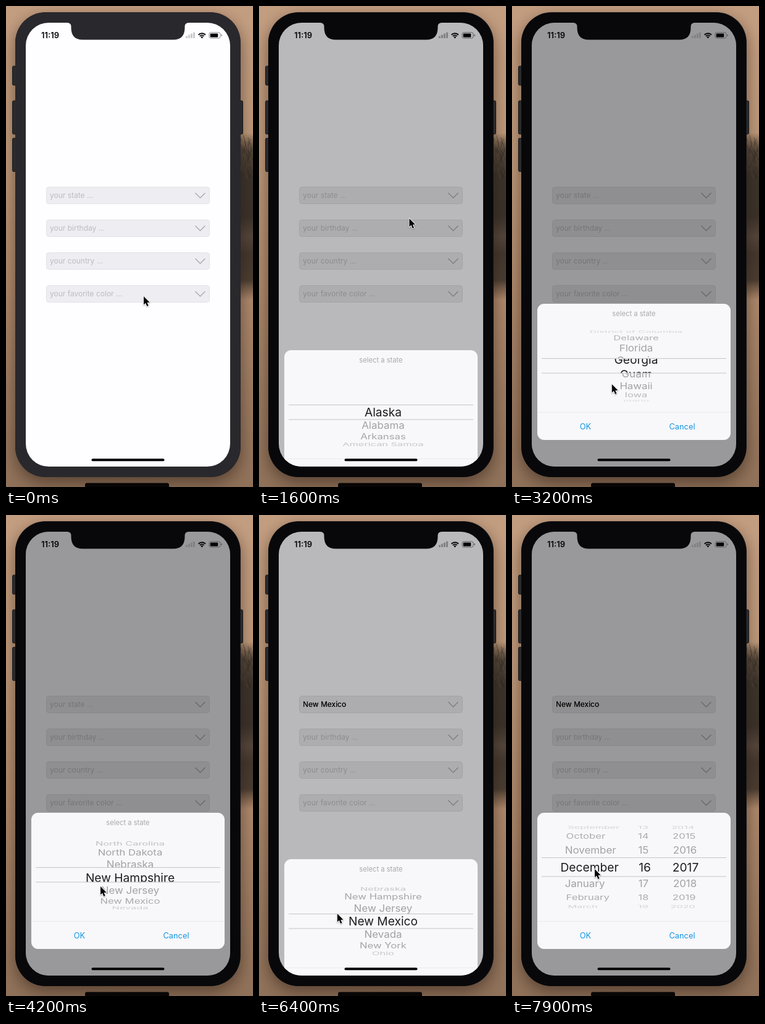
Write an HTML page with a canvas that moves like this. It is 400 px wide and 777 px high and loops after 8 s.

```html
<!DOCTYPE html>
<html lang="en">
<head>
<meta charset="utf-8">
<title>Picker demo</title>
<style>
  html, body { margin: 0; width: 100%; height: 100%; overflow: hidden; background: #a58466; }
  canvas { display: block; width: 400px; height: 777px; }
</style>
</head>
<body>
<canvas id="stage"></canvas>
<script>
const W = 400, H = 777, LOOP = 8000, STEP = 100;
const FONT = 'Inter, Roboto, sans-serif';
const dpr = window.devicePixelRatio || 1;

const STATES = ('Alaska,Alabama,Arkansas,American Samoa,Arizona,California,Colorado,Connecticut,' +
  'District of Columbia,Delaware,Florida,Georgia,Guam,Hawaii,Iowa,Idaho,Illinois,Indiana,Kansas,' +
  'Kentucky,Louisiana,Massachusetts,Maryland,Maine,Michigan,Minnesota,Missouri,Mississippi,Montana,' +
  'North Carolina,North Dakota,Nebraska,New Hampshire,New Jersey,New Mexico,Nevada,New York,Ohio,' +
  'Oklahoma,Oregon,Pennsylvania').split(',');
const MONTHS = ('January,February,March,April,May,June,July,August,September,October,' +
  'November,December').split(',');
const FIELDS = ['your state ...', 'your birthday ...', 'your country ...', 'your favorite color ...'];

// Tables of [time, value...]
const CURSOR = [
  [0, 223, 469], [200, 226, 455], [800, 264, 318], [1300, 249, 309], [1500, 249, 310],
  [2000, 221, 476], [2400, 172, 640], [2500, 170, 645], [2800, 165, 550], [3100, 163, 655],
  [3350, 160, 545], [3600, 158, 660], [3900, 155, 560], [4200, 153, 600], [4600, 150, 606],
  [5300, 123, 675], [5600, 121, 685], [6300, 121, 685], [6800, 150, 480], [7200, 168, 353],
  [7400, 168, 354], [7900, 134, 572]
];
const SCROLL = [
  [2500, 0], [2800, 4], [3100, 9], [3350, 15], [3600, 21], [3900, 27.5],
  [4200, 31.81], [4500, 33.3], [5000, 34]
];
const OPEN = [[1400, 0], [1800, 1], [6200, 1], [6600, 0], [7300, 0], [7700, 1]];
const DARKEN = 1500, PICKED = 6300, DATE = 7000;

function makeCanvas(el) {
  el.width = W * dpr;
  el.height = H * dpr;
  const c = el.getContext('2d');
  c.scale(dpr, dpr);
  return c;
}

const ctx = makeCanvas(document.getElementById('stage'));
const backdrop = document.createElement('canvas');
paintBackdrop(makeCanvas(backdrop));

function track(keys, t) {
  const next = keys.findIndex(k => k[0] > t);
  if (next === 0) return keys[0].slice(1);
  if (next < 0) return keys[keys.length - 1].slice(1);
  const a = keys[next - 1], b = keys[next];
  const p = (t - a[0]) / (b[0] - a[0]);
  return a.slice(1).map((v, i) => v + (b[i + 1] - v) * p);
}

function box(c, x, y, w, h, r, fill, stroke) {
  c.beginPath();
  c.roundRect(x, y, w, h, r);
  if (fill) { c.fillStyle = fill; c.fill(); }
  if (stroke) { c.strokeStyle = stroke; c.lineWidth = 1; c.stroke(); }
}

function line(points, color, width) {
  ctx.beginPath();
  points.forEach(([x, y]) => ctx.lineTo(x, y));
  ctx.strokeStyle = color;
  ctx.lineWidth = width;
  ctx.stroke();
}

// y is the middle of the capital letters
function text(str, x, y, size, color, align = 'left', weight = 400) {
  ctx.font = `${weight} ${size}px ${FONT}`;
  ctx.textAlign = align;
  ctx.fillStyle = color;
  ctx.fillText(str, x, y + size * 0.36);
}

function vertical(c, y0, y1, stops) {
  const g = c.createLinearGradient(0, y0, 0, y1);
  stops.forEach(([p, color]) => g.addColorStop(p, color));
  return g;
}

function paintBackdrop(c) {
  c.fillStyle = vertical(c, 0, H, [
    [0, '#c39d80'], [0.3, '#bd9879'], [0.6, '#ae886b'], [0.8, '#9c7b61'], [1, '#8f7058']
  ]);
  c.fillRect(0, 0, W, H);

  // tree behind the right edge
  let seed = 7;
  const rnd = () => (seed = seed * 16807 % 2147483647) / 2147483647;
  c.fillStyle = vertical(c, 205, 475, [
    [0, 'rgba(74,62,48,0)'], [0.1, '#54473a'], [0.25, '#3b332a'], [0.5, '#3a3128'],
    [0.62, '#54453a'], [0.72, '#43372d'], [0.88, '#4a3c30'], [1, 'rgba(90,70,54,0)']
  ]);
  c.fillRect(376, 205, 24, 270);
  c.lineWidth = 0.7;
  for (let i = 0; i < 60; i++) {
    const x = 378 + rnd() * 22, y = 222 + rnd() * 60;
    c.strokeStyle = i % 3 ? 'rgba(50,42,33,.7)' : 'rgba(120,98,76,.4)';
    c.beginPath();
    c.moveTo(x, y);
    c.lineTo(x + rnd() * 12 - 6, y - 6 - rnd() * 10);
    c.stroke();
  }

  c.save();
  c.shadowColor = 'rgba(30,18,10,.5)';
  c.shadowBlur = 26 * dpr;
  c.shadowOffsetY = 9 * dpr;
  box(c, 15, 10, 365, 751, 49, '#29282c');
  c.restore();
  box(c, 128, 770.5, 136, 12, 3, '#080606');
}

function drawPhone(dark) {
  [[10, 97, 31], [10, 153, 54], [10, 213.5, 54], [377, 153, 54]].forEach(([x, y, h]) =>
    box(ctx, x + 0.5, y, 6, h, 2, '#2b2a2c', '#19181a'));
  box(ctx, 15, 10.5, 364.5, 750.5, 49, dark ? '#08080a' : '#29282c');
}

function drawFields(t, dark) {
  FIELDS.forEach((label, i) => {
    const y = 306 + i * 53;
    box(ctx, 65.5, y - 13.5, 264, 27, 4, dark ? '#e8e7eb' : '#eeedf2', dark ? '#dcdbdf' : '#e2e1e7');
    const filled = i === 0 && t >= PICKED;
    text(filled ? 'New Mexico' : label, 71, y, 12, filled ? '#111' : '#bdbcc1');
    line([[306.5, y - 4], [314.5, y + 4], [322.5, y - 4]], '#acabb0', 1.5);
  });
}

// Cylinder of rows; the middle band shows the same rows enlarged and dark
function drawWheel(cy, radius, step, half, cols) {
  const rows = (big, zoom) => cols.forEach(col => {
    const base = Math.round(col.pos);
    for (let i = base - 4; i <= base + 4; i++) {
      const label = col.label(i), angle = (i - col.pos) * step;
      const cos = Math.cos(angle);
      if (!label || cos < 0.2) continue;
      const s = 1 - 0.07 * (1 - cos);
      ctx.save();
      ctx.globalAlpha = big ? 1 : 0.42 * Math.min(1, cos * 1.3);
      ctx.translate(200 + ((big ? col.bigX : col.x) - 200) * s, cy + radius * Math.sin(angle) * zoom);
      ctx.scale(s, cos);
      text(label, 0, 0, big ? 19.2 : 17, big ? '#1c1c1e' : '#2a2a2c', col.align);
      ctx.restore();
    }
  });
  ctx.save();
  ctx.beginPath();
  ctx.rect(41, cy - 73, 313, 73 - half);
  ctx.rect(41, cy + half, 313, 73 - half);
  ctx.clip();
  rows(false, 1);
  ctx.restore();
  ctx.save();
  ctx.beginPath();
  ctx.rect(41, cy - half, 313, half * 2);
  ctx.clip();
  rows(true, 1.13);
  ctx.restore();
  [cy - half, cy + half].forEach(y => line([[48, y], [347, y]], '#c4c3c7', 1));
}

function drawCard(t) {
  box(ctx, 41, 481, 313, 220, 11, '#f8f7fa');
  if (t < DATE) {
    text('select a state', 197.5, 497, 11.2, '#a9a8ac', 'center');
    drawWheel(581.2, 58, 0.372, 11.8, [
      { pos: track(SCROLL, t)[0], label: i => STATES[i], x: 201, bigX: 201, align: 'center' }
    ]);
  } else {
    drawWheel(568.8, 67.5, 0.412, 15.2, [
      { pos: 11, label: i => MONTHS[(i + 12) % 12], x: 85, bigX: 78.5, align: 'left' },
      { pos: 16, label: i => String(i), x: 213, bigX: 215, align: 'center' },
      { pos: 2017, label: i => String(i), x: 280.5, bigX: 281, align: 'center' }
    ]);
  }
  line([[41, 656.5], [354, 656.5]], '#ebeaee', 1);
  text('OK', 119, 679.5, 12.8, '#1496e2', 'center');
  text('Cancel', 275.5, 679.5, 12.8, '#1496e2', 'center');
}

function drawStatus(shade) {
  text('11:19', 57, 47.5, 13, '#050505', 'left', 600);
  for (let i = 0; i < 4; i++) {
    const h = 3.5 + i * 2;
    box(ctx, 291 + i * 4, 52 - h, 3, h, 0.8, shade ? '#828184' : '#cbcacc');
  }
  ctx.strokeStyle = '#050505';
  ctx.lineWidth = 1.9;
  [4.6, 7.8].forEach(r => {
    ctx.beginPath();
    ctx.arc(317.3, 52, r, -Math.PI * 0.76, -Math.PI * 0.24);
    ctx.stroke();
  });
  ctx.beginPath();
  ctx.moveTo(317.3, 52.5);
  ctx.arc(317.3, 52.2, 2.7, -Math.PI * 0.76, -Math.PI * 0.24);
  ctx.fillStyle = '#050505';
  ctx.fill();
  box(ctx, 329, 42.8, 18, 9.2, 2.6, null, shade ? '#5d5c5f' : '#8b8a8c');
  box(ctx, 330.7, 44.4, 12.6, 6, 1.2, '#050505');
  box(ctx, 348.4, 45.8, 1.4, 3.2, 0.7, shade ? '#5d5c5f' : '#8b8a8c');
}

function drawNotch(dark) {
  ctx.fillStyle = dark ? '#08080a' : '#29282c';
  ctx.fill(new Path2D('M99 26 V27 Q105.5 27.5 105.5 33 V36 Q106 54.5 124 54.5 ' +
    'H271 Q289 54.5 289.5 36 V33 Q289.5 27.5 296 27 V26 Z'));
}

function drawCursor(x, y) {
  const arrow = new Path2D('M0 0 V13.6 L3.1 10.8 L5.3 16 L7.7 15 L5.5 10 L9.7 9.7 Z');
  ctx.save();
  ctx.translate(x, y);
  ctx.shadowColor = 'rgba(0,0,0,.3)';
  ctx.shadowBlur = 2 * dpr;
  ctx.shadowOffsetY = dpr;
  ctx.lineWidth = 1.8;
  ctx.lineJoin = 'round';
  ctx.strokeStyle = '#fff';
  ctx.stroke(arrow);
  ctx.shadowColor = 'transparent';
  ctx.fillStyle = '#050505';
  ctx.fill(arrow);
  ctx.restore();
}

function draw(t) {
  const dark = t >= DARKEN;
  const open = track(OPEN, t)[0];
  const shade = Math.min(1, open / 0.75);

  ctx.drawImage(backdrop, 0, 0, W, H);
  drawPhone(dark);

  ctx.save();
  ctx.beginPath();
  ctx.roundRect(32, 27, 331, 717, 37);
  ctx.clip();
  ctx.fillStyle = dark ? '#f8f7fa' : '#fefdff';
  ctx.fillRect(32, 27, 331, 717);
  drawFields(t, dark);
  ctx.fillStyle = `rgba(0,0,0,${0.385 * shade})`;
  ctx.fillRect(32, 27, 331, 717);
  // the dimmed first value stays crisp
  if (t >= PICKED) text('New Mexico', 71, 306, 12, '#0a0a0a');
  if (open > 0) {
    ctx.save();
    ctx.translate(0, 300 * (1 - open) ** 2);
    drawCard(t);
    ctx.restore();
  }
  drawStatus(shade > 0.5);
  box(ctx, 138.5, 731.3, 118, 4, 2, '#050505');
  ctx.restore();

  drawNotch(dark);
  drawCursor(...track(CURSOR, t));
}

const start = performance.now();
function tick() {
  const t = (performance.now() - start) % LOOP;
  draw(Math.floor(t / STEP) * STEP);
  requestAnimationFrame(tick);
}
tick();
</script>
</body>
</html>
```
